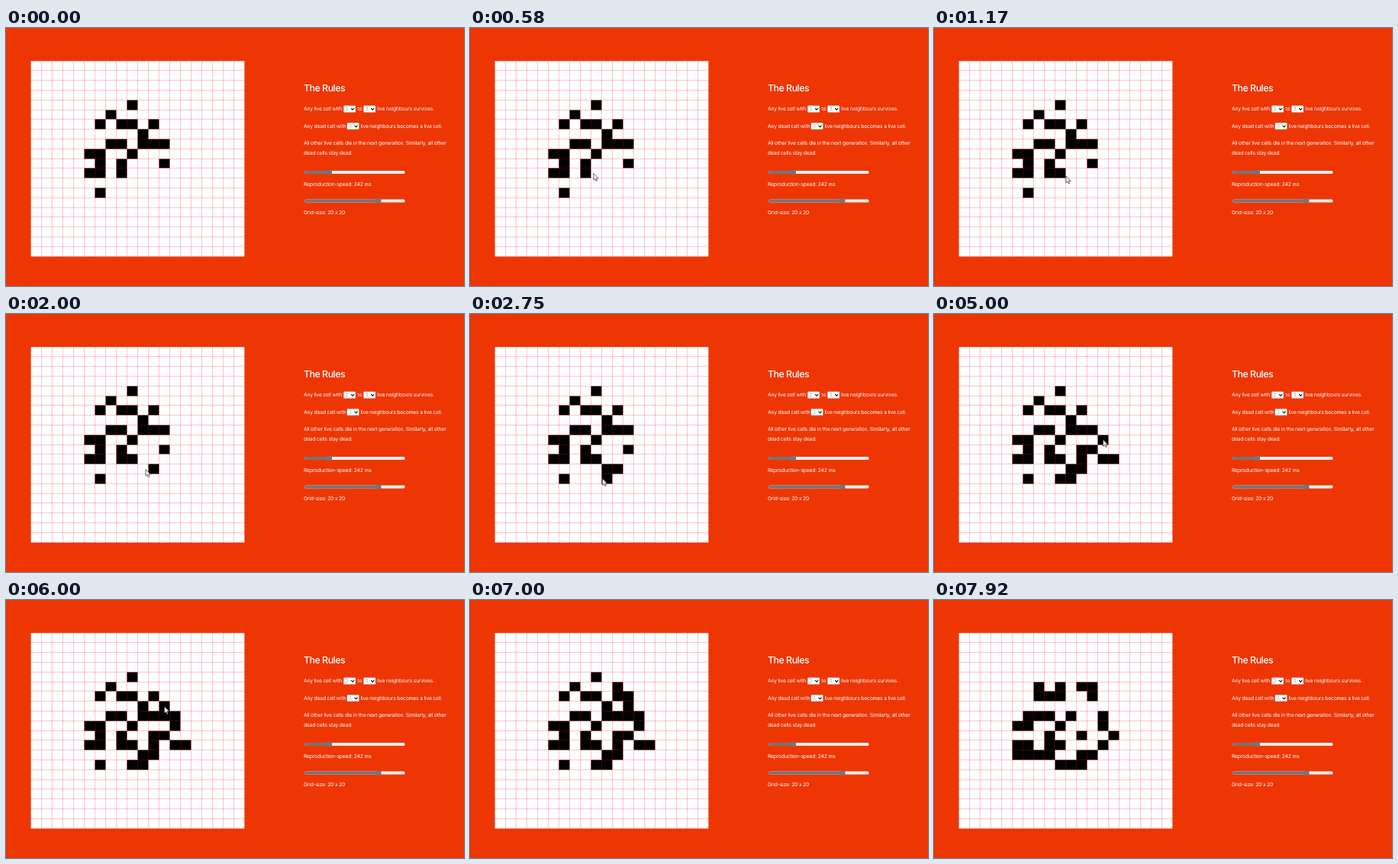
Recreate the animation shown at these times as an HTML page. Size 600x338 px, loop 8 s.

```html
<!DOCTYPE html>
<html lang="en">
<head>
<meta charset="utf-8">
<title>The Rules</title>
<style>
  html, body { margin: 0; width: 100%; height: 100%; overflow: hidden; background: #ee3605; }
  svg { display: block; width: 100vw; height: 100vh; }
  text { font: 400 6.8px Inter, "Open Sans", sans-serif; letter-spacing: -.2px; fill: #fff; text-rendering: geometricPrecision; }
  .title { font-size: 12.4px; font-weight: 500; letter-spacing: -.5px; }
  .choice { fill: #aaa; }
</style>
</head>
<body>
<svg viewBox="0 0 600 338">
  <rect width="600" height="338" fill="#ee3605"/>
  <rect x="32.5" y="43" width="280" height="256.5" fill="#fff"/>
  <path id="cells"/>
  <g id="grid" stroke="#e4142c" stroke-opacity=".24"/>

  <text class="title" x="390" y="83">The Rules</text>
  <text x="390" y="108.3">Any live cell with</text>
  <text x="460.5" y="108.3">to</text>
  <text x="486" y="108.3">live neighbours survives.</text>
  <text x="390" y="130.8">Any dead cell with</text>
  <text x="464.5" y="130.8">live neighbours becomes a live cell.</text>
  <text x="390" y="153.4">All other live cells die in the next generation. Similarly, all other</text>
  <text x="390" y="165.8">dead cells stay dead.</text>
  <text x="390" y="206.6">Reproduction-speed: 242 ms</text>
  <text x="390" y="243.9">Grid-size: 20 x 20</text>
  <g id="controls"></g>

  <path id="cursor" d="M0 0V8.8L2 7 3.3 10 4.8 9.4 3.5 6.4H6.2Z" fill="#fff" stroke="#222" stroke-width=".7"/>
</svg>
<script>
const LOOP = 8000, STEP = 1000 / 12, STEPS_PER_BEAT = 4, SIZE = 20;
const ENTER = .25, EXIT = 21, GENERATION = 23.75; // in beats
const $ = id => document.getElementById(id);
const lineX = col => 32.5 + 14 * col;
const lineY = row => 43.5 + Math.floor(12.8 * row);
const key = (col, row) => row * SIZE + col;

// A stroke "col,row col,row ..." fills every cell along its straight and diagonal segments
function strokeCells(stroke) {
  const corners = stroke.split(' ').map(point => point.split(',').map(Number));
  let [col, row] = corners[0];
  const cells = [[col, row]];
  for (const [toCol, toRow] of corners) {
    while (col !== toCol || row !== toRow) {
      col += Math.sign(toCol - col);
      row += Math.sign(toRow - row);
      cells.push([col, row]);
    }
  }
  return cells;
}

const startCells = [
  '9,4', '7,5 6,6', '8,6 9,6 11,8 12,8', '11,6', '10,8',
  '7,8 8,8 9,9 8,10 8,11', '5,9 6,9 6,11 5,11', '12,10', '6,13'
].flatMap(strokeCells).map(cell => key(...cell));

// Strokes drawn with the pointer: one cell per beat from the given beat on
const clicks = Object.entries({
  3.25: '9,11', 5: '11,12', 7: '10,12 10,13 9,13', 10: '11,11 11,10',
  12: '13,11 14,11', 15: '13,9 13,8', 18: '12,7 12,6 11,5'
}).flatMap(([beat, stroke]) => strokeCells(stroke).map(([col, row], i) => ({ beat: +beat + i, col, row })))
  .sort((a, b) => a.beat - b.beat);

const stops = [
  { beat: ENTER, x: lineX(8.5), y: lineY(11.5) },
  ...clicks.map(({ beat, col, row }) => ({ beat, x: lineX(col + .5), y: lineY(row + .5) })),
  { beat: EXIT, x: 180, y: 308 }
];

function nextGeneration(cells) {
  const next = new Set();
  for (let row = 0; row < SIZE; row++) for (let col = 0; col < SIZE; col++) {
    let count = 0;
    for (let r = row - 1; r <= row + 1; r++) for (let c = col - 1; c <= col + 1; c++) {
      if ((r !== row || c !== col) && c >= 0 && c < SIZE && cells.has(key(c, r))) count++;
    }
    if (count === 3 || count === 2 && cells.has(key(col, row))) next.add(key(col, row));
  }
  return next;
}

function cellsAt(beat) {
  const cells = new Set(startCells);
  for (const click of clicks) if (beat >= click.beat) cells.add(key(click.col, click.row));
  return beat >= GENERATION ? nextGeneration(cells) : cells;
}

function cellPath(cell) {
  const col = cell % SIZE, row = Math.floor(cell / SIZE);
  return `M${lineX(col)} ${lineY(row)}H${lineX(col + 1)}V${lineY(row + 1)}H${lineX(col)}Z`;
}

function pointerAt(beat) {
  const i = stops.findIndex(stop => stop.beat > beat);
  const from = stops[i - 1], to = stops[i];
  const left = (to.beat - beat) / (to.beat - from.beat);
  const eased = 1 - left * left;
  return [from.x + (to.x - from.x) * eased, from.y + (to.y - from.y) * eased];
}

const select = (x, y, value) => `
  <rect x="${x}" y="${y}" width="15.6" height="8.6" rx=".6" fill="#fff" stroke="#aaa" stroke-width=".4"/>
  <text class="choice" x="${x + 2}" y="${y + 6.6}">${value}</text>
  <path d="M${x + 9.8} ${y + 3.4}l2 2 2-2" fill="none" stroke="#111" stroke-width="1.1"/>`;

const slider = (y, thumb) => `
  <rect x="391.5" y="${y - 2}" width="131" height="4" rx="1.5" fill="#efefef"/>
  <rect x="391.5" y="${y - 2}" width="${thumb - 391.5}" height="4" rx="1.5" fill="#757575"/>
  <rect x="${thumb - 3.5}" y="${y - 3}" width="7" height="6" rx=".6" fill="#757575"/>`;

$('controls').innerHTML = select(442.3, 101.8, 2) + select(468.4, 101.8, 3) +
  select(446.8, 124.2, 3) + slider(189, 423.5) + slider(226.5, 488);

for (let i = 0; i <= SIZE; i++) {
  $('grid').innerHTML += `<path d="M${lineX(i)} 43V300"/><path d="M32 ${lineY(i)}H313"/>`;
}

function draw(now) {
  // The picture advances twelve times a second
  const beat = Math.floor((now % LOOP + 4) / STEP) / STEPS_PER_BEAT;
  const pointing = beat >= ENTER && beat < EXIT;
  $('cells').setAttribute('d', [...cellsAt(beat)].map(cellPath).join(''));
  $('cursor').setAttribute('visibility', pointing ? 'visible' : 'hidden');
  if (pointing) $('cursor').setAttribute('transform', `translate(${pointerAt(beat)})`);
}

let start;
function tick(now) {
  start ??= now;
  draw(now - start);
  requestAnimationFrame(tick);
}
draw(0);
requestAnimationFrame(tick);
</script>
</body>
</html>
```
